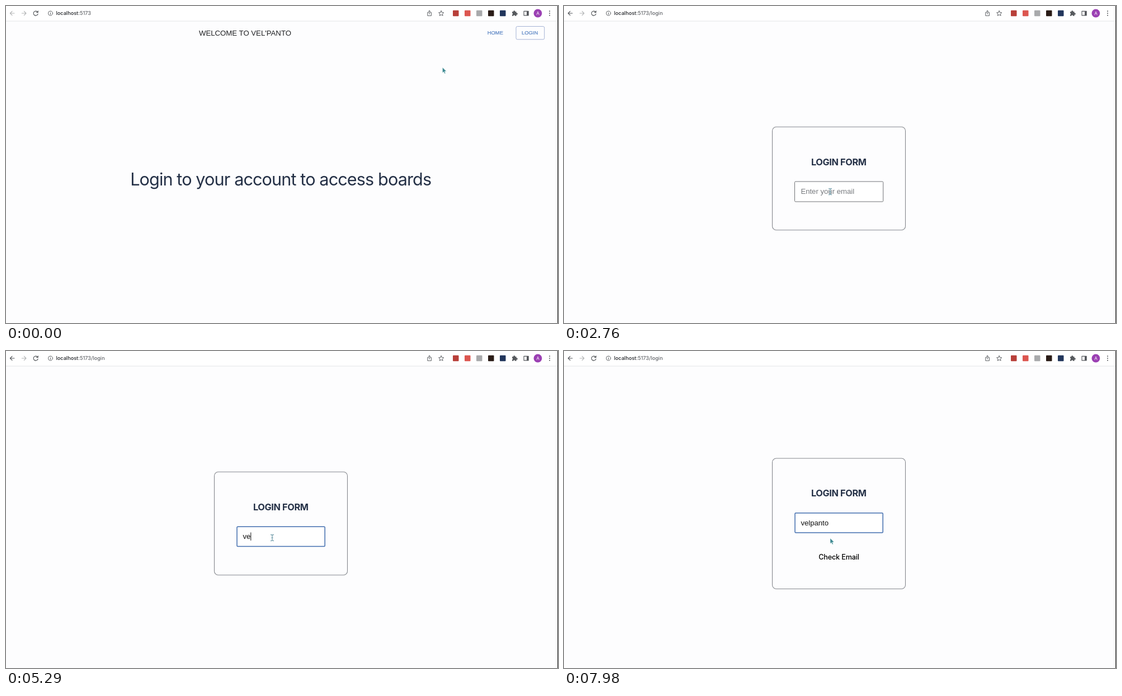
Animation of 987 by 567 pixels, one loop 8 s. Source, as an HTML page:

```html
<!DOCTYPE html>
<html lang="en">
<head>
<meta charset="utf-8">
<title>Login form</title>
<style>
  html, body { margin: 0; width: 100%; height: 100%; overflow: hidden; background: #fdfdfe; }
  svg { display: block; width: 987px; height: 567px; }
  text { font-family: Inter, Roboto, sans-serif; font-optical-sizing: none; white-space: pre; }
  .arial { font-family: "Liberation Sans", Arial, sans-serif; }
  .line { fill: none; stroke: #55585c; stroke-width: 1.15; stroke-linecap: round; stroke-linejoin: round; }
  .url { font-size: 9.15px; font-weight: 500; fill: #64676b; }
  .hero { font-size: 30.6px; letter-spacing: -.88px; fill: #243046; }
  .title { font-size: 16.3px; font-weight: 700; letter-spacing: -.36px; fill: #243046; }
  .nav { font-size: 9.4px; fill: #5580c2; stroke: #5580c2; stroke-width: .2px; }
  .field { font-size: 13.15px; }
  .check { font-size: 12.6px; font-weight: 500; letter-spacing: -.15px; }
  .list text { font-size: 8.45px; font-weight: 500; fill: #303236; }
</style>
</head>
<body>
<svg viewBox="0 0 987 567">
  <defs>
    <filter id="shadow" x="-10%" y="-10%" width="120%" height="120%">
      <feDropShadow dx="0" dy=".6" stdDeviation="1" flood-color="#000" flood-opacity=".3"/>
    </filter>
  </defs>
  <rect width="987" height="567" fill="#fdfdfe"/>

  <g id="toolbar">
    <rect width="987" height="27" fill="#fff"/>
    <rect y="26.5" width="987" height="1" fill="#e4e5e7"/>
    <path id="back" class="line" d="M15 13H7.6M11 9.4L7.4 13L11 16.6"/>
    <path class="line" stroke-opacity=".45" d="M28.3 13H35.7M32.3 9.4L35.9 13L32.3 16.6"/>
    <path class="line" d="M56.5 10.8A4 4 0 1 0 57.1 14M57.3 8.8V11.3H54.6"/>
    <circle class="line" cx="79.5" cy="13" r="4" style="stroke-width:.9"/>
    <path class="line" d="M79.5 12.8V15M79.5 11V11.1" style="stroke-width:1"/>
    <text class="url" x="89.5" y="16.3"><tspan fill="#24262a">localhost</tspan>:5173<tspan id="path"></tspan></text>
    <path class="line" d="M755.5 11.6H753.8V17.4H760.4V11.6H758.7M757.1 14.5V8.3M755.2 10.1L757.1 8.2L759 10.1" style="stroke-width:.95"/>
    <path class="line" d="M778.2 8.6L779.6 11.6L782.8 11.9L780.4 14.1L781.1 17.3L778.2 15.6L775.3 17.3L776 14.1L773.6 11.9L776.8 11.6Z" style="stroke-width:.95"/>
    <g id="addons"></g>
    <path fill="#55585c" d="M905 10.3H907.4A1.5 1.5 0 1 1 910.2 10.3H912.6V12.7A1.5 1.5 0 1 1 912.6 15.3V17.8H910.2A1.5 1.5 0 0 0 907.2 17.8H905V15.4A1.5 1.5 0 0 0 905 12.5Z"/>
    <rect class="line" x="926" y="9.3" width="8" height="7.6"/>
    <path fill="#55585c" d="M931 9H934.5V17H931Z"/>
    <circle cx="950.9" cy="13" r="7.4" fill="#9b40b3"/>
    <text x="950.9" y="15.9" text-anchor="middle" fill="#fff" style="font-size:8px">A</text>
    <g fill="#55585c"><circle cx="972" cy="9.3" r="1"/><circle cx="972" cy="13" r="1"/><circle cx="972" cy="16.7" r="1"/></g>
  </g>

  <g id="home">
    <text class="arial" x="345" y="52.8" fill="#202124" style="font-size:13.2px">WELCOME TO VEL'PANTO</text>
    <text class="arial nav" x="860.8" y="51.4">HOME</text>
    <rect id="button" x="912" y="36.5" width="50.7" height="23.3" rx="2.5"/>
    <text class="arial nav" x="922" y="51.4">LOGIN</text>
    <text class="hero" x="491.2" y="321" text-anchor="middle">Login to your account to access boards</text>
  </g>

  <g id="login">
    <rect id="card" x="372.5" width="238" rx="7" fill="none" stroke="#85888e" stroke-width="1.1"/>
    <g id="form">
      <text class="title" x="491.3" y="284.5" text-anchor="middle">LOGIN FORM</text>
      <rect id="input" rx="1.5" fill="#fff"/>
      <text id="value" class="arial field" x="423.4" y="336.4"></text>
      <rect id="caret" y="324.5" width="1" height="14.5" fill="#111"/>
    </g>
    <text id="check" class="check" x="491.5" y="372.6" text-anchor="middle">Check Email</text>
    <g id="popup" class="list">
      <rect x="477" y="355.5" width="141.5" height="147.5" rx="1.5" fill="#fff" filter="url(#shadow)"/>
    </g>
  </g>

  <path id="arrow" fill="#3c8890" stroke="#e4f0f2" stroke-width=".5" d="M0 0V9.4L2.2 7.5L3.8 11L5.3 10.3L3.7 7L6.8 6.7Z"/>
  <path id="beam" fill="none" stroke="#7fa6b2" stroke-width="1.3" d="M-3 -5.5Q0 -5.5 0 -3.8Q0 -5.5 3 -5.5M0 -4V4M-3 5.5Q0 5.5 0 3.8Q0 5.5 3 5.5M-1.5 0H1.5"/>
  <rect x="986" width="1" height="567" fill="#222"/>
</svg>

<script>
const LOOP = 8000;
const $ = id => document.getElementById(id);
const set = (node, attrs) => {
  for (const key in attrs) node.setAttribute(key, attrs[key]);
};
const svg = (tag, attrs, parent) => {
  const node = document.createElementNS("http://www.w3.org/2000/svg", tag);
  set(node, attrs);
  return parent.appendChild(node);
};
const show = (id, on) => { $(id).style.display = on ? "" : "none"; };

["#b8403a", "#dc5650", "#a9aaac", "#2a1c17", "#22365c"].forEach((fill, i) =>
  svg("rect", { x: 799 + 21 * i, y: 7.8, width: 10.5, height: 10.5, rx: 1, fill }, $("addons")));

[
  "alfin.tobek@ostvalle.edu",
  "axt530827@ostvalle.edu",
  "alfintobek.us@tovim.com",
  "+907305550286",
  "demo@qumel.com",
  "alfin.tobek.04.27@tovim.com"
].forEach((entry, i) => {
  svg("text", { x: 485, y: 374 + 23.55 * i }, $("popup")).textContent = entry;
});

// Each step changes part of the state and holds until the next one.
const start = {
  page: "home", at: [780.5, 110], beam: false, hover: false, focus: false,
  popup: 0, typed: "", caret: false, tall: false
};
const steps = [
  [410, { at: [812, 104] }],
  [530, { at: [884, 87] }],
  [650, { at: [931, 74] }],
  [930, { at: [933.5, 57] }],
  [1080, { at: [937, 50], hover: true }],
  [1200, { at: [938.7, 46] }],
  [1600, { page: "login", hover: false }],
  [1870, { at: [742, 127] }],
  [1990, { at: [593, 198] }],
  [2130, { at: [551, 222] }],
  [2250, { at: [524, 239] }],
  [2400, { at: [500, 272] }],
  [2520, { at: [483, 302] }],
  [2640, { at: [476, 332], beam: true, hover: true }],
  [2880, { focus: true, popup: 1, caret: true }],
  [3310, { caret: false }],
  [3820, { caret: true }],
  [4360, { caret: false }],
  [4890, { typed: "v", caret: true, popup: .5 }],
  [5010, { popup: 0, at: [476, 334] }],
  [5290, { typed: "ve" }],
  [5720, { typed: "vel", tall: true, beam: false, at: [476, 335] }],
  [6250, { caret: false }],
  [6710, { typed: "velp", caret: true }],
  [6860, { typed: "velpa" }],
  [6990, { typed: "velpan" }],
  [7280, { typed: "velpant" }],
  [7550, { typed: "velpanto" }],
  [7980, { caret: false }]
];

function draw(s) {
  const login = s.page === "login";
  show("home", !login);
  show("login", login);
  $("path").textContent = login ? "/login" : "";
  set($("back"), { "stroke-opacity": login ? 1 : .45 });
  set($("button"), {
    fill: s.hover ? "#f3f7fc" : "none",
    stroke: s.hover ? "#5c86c8" : "#a5b3d5"
  });

  set($("card"), s.tall ? { y: 192, height: 233.5 } : { y: 216.3, height: 184.4 });
  set($("form"), { transform: `translate(0 ${s.tall ? -24.5 : 0})` });
  show("check", s.tall);
  set($("input"), s.focus
    ? { x: 413, y: 314.3, width: 157.2, height: 35.2, stroke: "#416dae", "stroke-width": 1.5 }
    : { x: 412.5, y: 314, width: 158.2, height: 36, stroke: s.hover ? "#707276" : "#9c9ea1", "stroke-width": 1 });

  const value = $("value");
  value.textContent = s.typed || "Enter your email";
  set(value, { fill: s.typed ? "#111" : "#777a7e" });
  const width = s.typed && login ? value.getComputedTextLength() : 0;
  set($("caret"), { x: 423.4 + width });
  show("caret", s.caret);
  set($("popup"), { opacity: s.popup });

  show("arrow", !s.beam);
  show("beam", s.beam);
  set($(s.beam ? "beam" : "arrow"), { transform: `translate(${s.at})` });
}

let shown = -1;
function tick() {
  const time = performance.now() % LOOP;
  const past = steps.filter(([from]) => from <= time);
  if (past.length !== shown) {
    shown = past.length;
    draw(Object.assign({}, start, ...past.map(([, change]) => change)));
  }
  requestAnimationFrame(tick);
}
tick();
</script>
</body>
</html>
```
